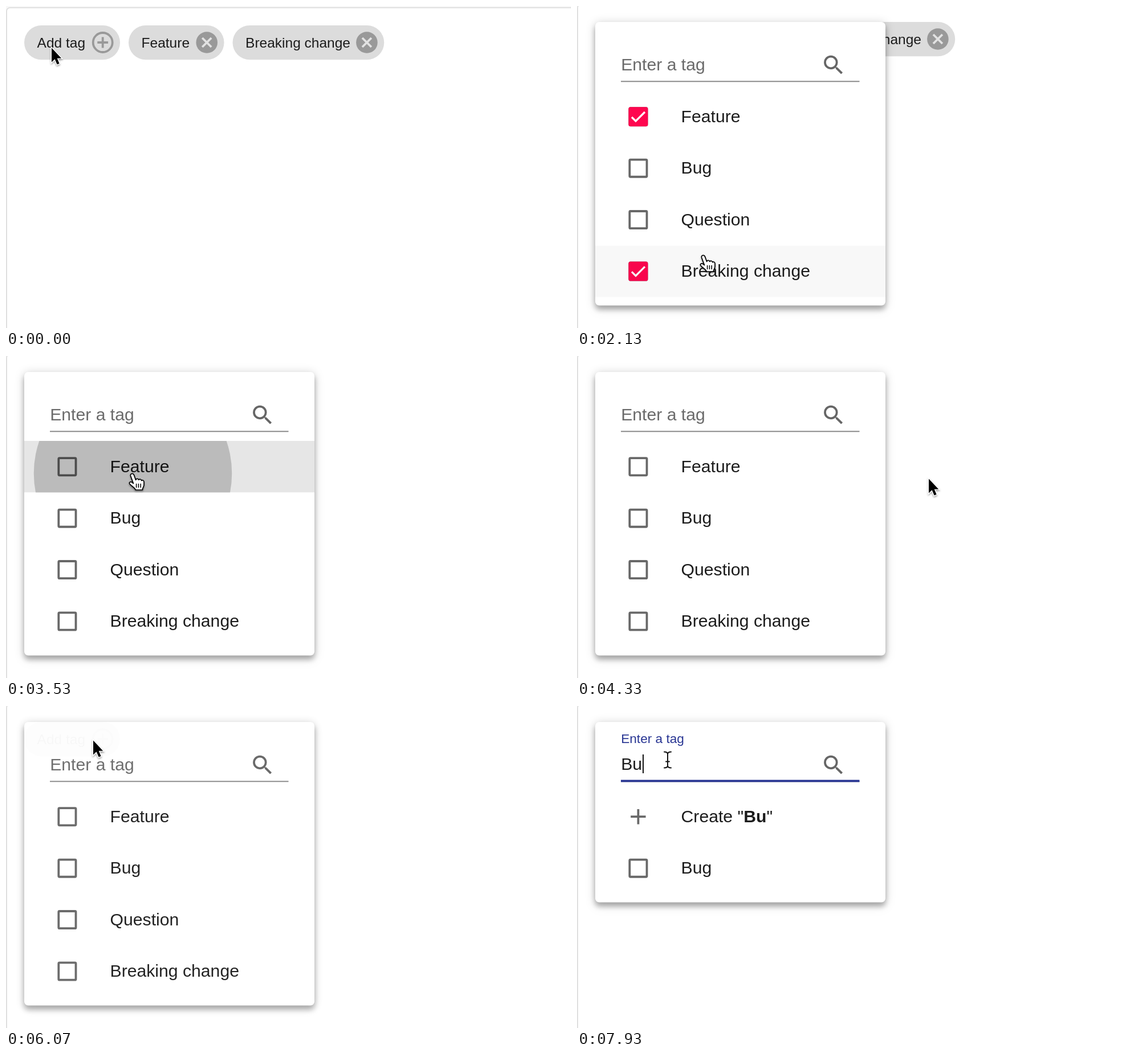
Animation, 991 px wide and 565 px high, one loop 8000 ms. Source, as an HTML page:

```html
<!DOCTYPE html>
<html lang="en">
<head>
<meta charset="utf-8">
<title>Tag picker</title>
<style>
  html, body { margin: 0; width: 100%; height: 100%; overflow: hidden; background: #fafafa; }
  svg { display: block; width: 991px; height: 565px; }
  text { font-family: "Liberation Sans", Arial, sans-serif; font-size: 30.16px; fill: #1c1c1c; white-space: pre; }
  .chip text { font-size: 24.5px; }
  #panel { filter: drop-shadow(0 0 0 transparent); }
  #card { fill: #fff; filter: drop-shadow(0 7px 5px rgba(0,0,0,.26)) drop-shadow(0 2px 8px rgba(0,0,0,.2)); }
</style>
</head>
<body>
<svg id="stage" viewBox="0 0 991 565" xmlns="http://www.w3.org/2000/svg">
  <defs>
    <clipPath id="rowClip"><rect id="rowClipBox" x="32" width="509" height="90.5"/></clipPath>
    <filter id="soft" x="-50%" y="-50%" width="200%" height="200%">
      <feDropShadow dx="0" dy="2" stdDeviation="1.6" flood-opacity=".4"/>
    </filter>
  </defs>
  <rect width="991" height="565" fill="#f8f8f8"/>
  <g id="page">
    <rect x="1" y="3" width="1100" height="700" rx="6" fill="#fff" stroke="#e0e0e0" stroke-width="2"/>
    <g id="chips"></g>
    <g id="panel">
      <rect id="card" x="32" y="34" width="509" rx="7"/>
      <g id="rows"></g>
      <path id="lens" transform="translate(427.4 87) scale(1.885)" fill="#666" d="M15.5 14h-.79l-.28-.27A6.47 6.47 0 0 0 16 9.5 6.5 6.5 0 1 0 9.5 16c1.61 0 3.09-.59 4.23-1.57l.27.28v.79l5 4.99L20.49 19zm-6 0a4.5 4.5 0 1 1 0-9 4.5 4.5 0 0 1 0 9z"/>
      <rect x="77" y="137.4" width="418.5" height="1.9" fill="#858585"/>
      <rect id="hoverLine" x="77" y="135.6" width="418.5" height="3.8" fill="#1c1c1c"/>
      <rect id="focusLine" y="135.6" height="3.8" fill="#283593"/>
      <text id="label" x="0" y="0">Enter a tag</text>
      <text id="typed" x="77.2" y="117.6"></text>
      <rect id="caret" y="91" width="2" height="33" fill="#111"/>
      <g clip-path="url(#rowClip)">
        <rect id="rowTint" x="32" width="509" height="90.5"/>
        <circle id="ripple"/>
      </g>
    </g>
  </g>
  <g id="cursor">
    <path id="arrow" filter="url(#soft)" fill="#000" stroke="#fff" stroke-width="2.6" paint-order="stroke"
      d="M1 1.5V26.5L6.6 21.2L10.6 30.6L14.6 28.9L10.7 19.8H18.2Z"/>
    <g id="beam" fill="none" stroke-linecap="round">
      <path id="beamPath" d="M-6-14C-2-14 0-13 0-10C0-13 2-14 6-14M0-10V10M-6 14C-2 14 0 13 0 10C0 13 2 14 6 14M-3 3H3"/>
    </g>
    <g id="hand" filter="url(#soft)" stroke="#000" stroke-width="1.7" stroke-linejoin="round" stroke-linecap="round">
      <path fill="#fff" d="M-3.4 3.5C-4.8-.8 1-2 2.4 1.6L5.6 10.5C6 8 10 7.6 11 10.4C12 8.4 15 9 15.6 11.6C17.2 10.2 20 11.3 20 14V19C20 22.5 17.4 24 17.4 28H5.2C4.5 24-1.5 22-5 17.5C-7 14.5-3.2 12.6-.6 15L1.4 16.6Z"/>
      <path fill="none" stroke-width="1.5" d="M6.6 17.5V23.5M10.4 17.5V23.5M14.2 17.5V23.5"/>
    </g>
  </g>
</svg>
<script>
const LOOP = 8000, ROW = 90.45, TOP = 155;
const $ = id => document.getElementById(id);
const set = (el, attrs) => { for (const k in attrs) el.setAttribute(k, attrs[k]); };
const show = (el, on) => el.setAttribute("visibility", on ? "inherit" : "hidden");
const prog = (t, a, b) => Math.min(1, Math.max(0, (t - a) / (b - a)));
const out = (p, n) => 1 - (1 - p) ** n;
const mix = (a, b, p) => a + (b - a) * p;

// cursor stops: time, x, y
const PATH = [
  [0, 79, 72], [310, 79, 72], [760, 100.5, 75.5], [1160, 100.5, 75.5], [1400, 222, 438],
  [2450, 222, 438], [2750, 237, 356], [2860, 237, 356], [3090, 222, 207], [3700, 222, 207],
  [4300, 616, 214], [4940, 616, 214], [5140, 149, 1], [5230, 149, 1], [5400, 114, 20],
  [5600, 150, 44], [5790, 150, 44], [5950, 152, 59], [6110, 152, 59], [6290, 159, 94.5],
  [6420, 159, 94.5], [6590, 184, 161], [6850, 184, 161], [7070, 159, 94.5], [LOOP, 159, 94.5]
];
const SHAPES = [[900, "arrow"], [1240, "beam"], [3800, "hand"], [6170, "arrow"], [6490, "beam"], [6950, "hand"], [LOOP, "beam"]];
const RIPPLES = [
  { start: 2150, row: 3, x: 222, y: 446, max: 326, tintEnd: 3060, tintFade: 60 },
  { start: 3102, row: 0, x: 222.5, y: 212, max: 324, tintEnd: 4000, tintFade: 330 }
];
const TAGS = [["Feature", 3160], ["Bug", 0], ["Question", 0], ["Breaking change", 2200]];

function makeChip(x, w, label, add) {
  const cx = x + w - 30.3;
  const icon = add
    ? `<circle cx="${cx}" cy="64" r="17" fill="none"/><path d="M${cx - 9.4} 64h18.8M${cx} 54.6v18.8"/>`
    : `<circle cx="${cx}" cy="64" r="18.8" fill="#999" stroke="none"/>
       <path stroke="#e2e2e2" d="M${cx - 8} 56l16 16m0-16l-16 16"/>`;
  $("chips").insertAdjacentHTML("beforeend", `<g class="chip">
    <rect x="${x}" y="34" width="${w}" height="60.3" rx="30.1" fill="#dcdcdc"/>
    <text x="${x + 22.6}" y="73.4">${label}</text>
    <g stroke="#999" stroke-width="3.8">${icon}</g></g>`);
  return $("chips").lastElementChild;
}
const addChip = makeChip(32, 168, "Add tag", true);
const featureChip = makeChip(215, 167.5, "Feature");
const breakingChip = makeChip(397.5, 265.7, "Breaking change");

function makeRow(inner) {
  $("rows").insertAdjacentHTML("beforeend", `<g>${inner}</g>`);
  return $("rows").lastElementChild;
}
const rows = TAGS.map(([name]) => makeRow(`
  <rect x="92.3" y="30.1" width="30.2" height="30.2" rx="1.5" fill="none" stroke="#686868" stroke-width="3.8"/>
  <g class="tick"><rect x="90.4" y="28.2" width="34" height="34" rx="3.5" fill="#ff064f"/>
  <path d="M96 46l7 7 16-16" fill="none" stroke="#fff" stroke-width="3.3"/></g>
  <text x="182.6" y="55">${name}</text>`));
const createRow = makeRow(`<path d="M94.2 45.2h26.4M107.4 32v26.4" stroke="#686868" stroke-width="3.8"/>
  <text x="182.6" y="55">Create "<tspan id="newTag" font-weight="bold"></tspan>"</text>`);

// pale halo under the text cursor
const halo = $("beamPath").cloneNode();
halo.removeAttribute("id");
set(halo, { stroke: "#fff", "stroke-width": 4, opacity: .85 });
$("beam").prepend(halo);
set($("beamPath"), { stroke: "#111", "stroke-width": 2 });

function drawCursor(t) {
  const i = PATH.findIndex(k => k[0] > t), a = PATH[i - 1], b = PATH[i];
  const p = prog(t, a[0], b[0]), e = p * p * (3 - 2 * p);
  set($("cursor"), { transform: `translate(${mix(a[1], b[1], e)} ${mix(a[2], b[2], e)})` });
  const kind = SHAPES.find(s => t < s[0])[1];
  for (const k of ["arrow", "beam", "hand"]) show($(k), k === kind);
  show($("cursor"), t < 7330 || t >= 7930);
}

function drawRows(t, typed) {
  const visible = typed ? TAGS.map(([n]) => n.toLowerCase().includes(typed.toLowerCase())) : TAGS.map(() => true);
  let slot = typed ? 1 : 0;
  show(createRow, !!typed);
  set(createRow, { transform: `translate(0 ${TOP})` });
  $("newTag").textContent = typed;
  rows.forEach((row, i) => {
    show(row, visible[i]);
    if (visible[i]) set(row, { transform: `translate(0 ${TOP + ROW * slot++})` });
    set(row.querySelector(".tick"), { opacity: 1 - prog(t, TAGS[i][1] - 45, TAGS[i][1] + 45) });
  });
  set($("card"), { height: 135.7 + ROW * slot });
}

function drawRipple(t) {
  const r = t < RIPPLES[1].start - 40 ? RIPPLES[0] : RIPPLES[1];
  const y = TOP + ROW * r.row, age = t - r.start;
  set($("rowClipBox"), { y });
  set($("rowTint"), { y, opacity: .098 * prog(age, -40, 40) * (1 - prog(t, r.tintEnd, r.tintEnd + r.tintFade)) });
  set($("ripple"), {
    cx: r.x, cy: r.y, r: r.max * prog(age, 0, 800),
    opacity: age < 0 ? 0 : .19 * (1 - prog(age, 550, 950))
  });
}

function drawField(t, typed) {
  const lift = out(prog(t, 6340, 6740), 3), line = out(prog(t, 6340, 6640), 2);
  const rgb = [[107, 40], [107, 53], [107, 147]].map(c => Math.round(mix(c[0], c[1], lift)));
  set($("label"), {
    transform: `translate(77.2 ${mix(118.8, 71.3, lift)}) scale(${mix(1, .75, lift)})`,
    style: `fill:rgb(${rgb})`
  });
  set($("hoverLine"), { opacity: prog(t, 850, 1000) * (1 - prog(t, 1200, 1400)) });
  const w = 418.5 * mix(.5, 1, line);
  set($("focusLine"), { x: 286.2 - w / 2, width: w, opacity: Math.min(1, line * 1.5) });
  $("typed").textContent = typed;
  set($("caret"), { x: [77.5, 98, 115][typed.length] });
  show($("caret"), (t >= 6340 && t < 6870) || t >= 7330);
}

function drawPanel(t) {
  const start = t < 4530 ? 800 : 5800;
  const open = t >= start && (t < 4530 || t >= 5800);
  const s = mix(.8, 1, out(prog(t, start, start + 220), 4));
  show($("panel"), open);
  set($("panel"), {
    opacity: out(prog(t, start, start + 330), 2),
    transform: `translate(32 34) scale(${s}) translate(-32 -34)`
  });
}

function render(t) {
  const typed = t < 7330 ? "" : t < 7530 ? "B" : "Bu";
  const scroll = t < 1730 ? 0 : t < 1800 ? -3 : -6;
  set($("page"), { transform: `translate(0 ${scroll})` });
  show(featureChip, t < 3160);
  show(breakingChip, t < 2200);
  set(addChip, { opacity: t >= 4530 && t < 4670 ? .92 : 1 });
  drawPanel(t);
  drawRows(t, typed);
  drawField(t, typed);
  drawRipple(t);
  drawCursor(t);
}

const begin = performance.now();
function tick() {
  render((performance.now() - begin) % LOOP);
  requestAnimationFrame(tick);
}
tick();
</script>
</body>
</html>
```
